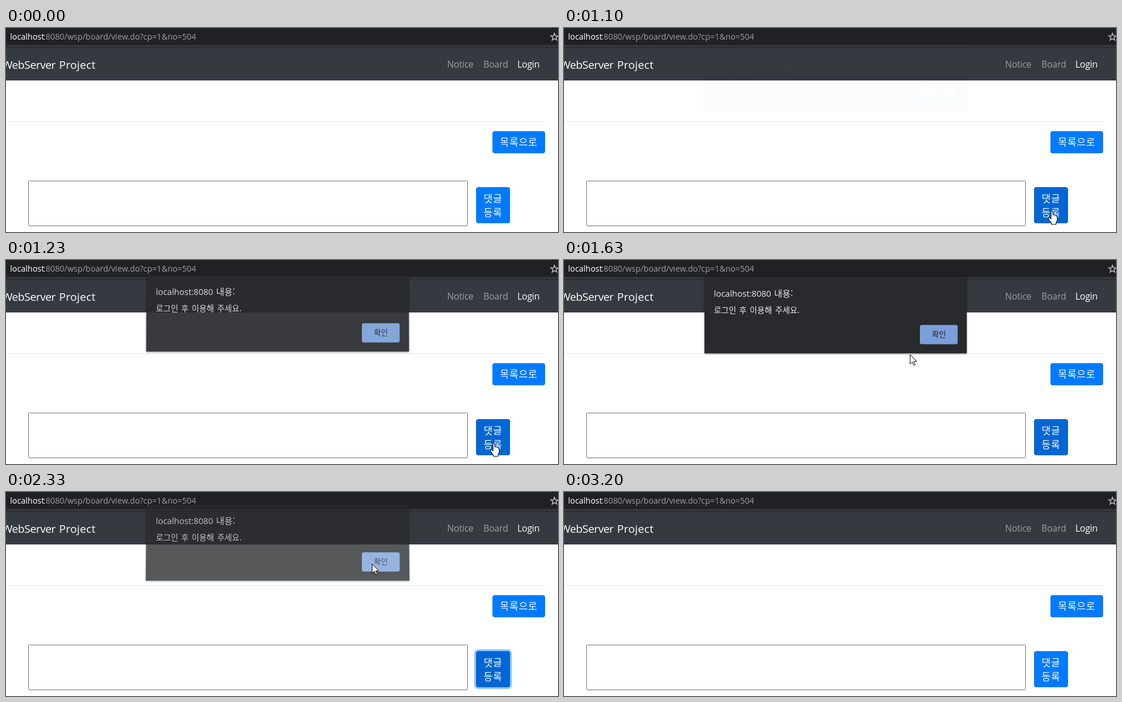
These frames come from a looping animation (943x350 px, 3.23 s). An HTML page:

```html
<!DOCTYPE html>
<html lang="ko">
<head>
<meta charset="utf-8">
<title>Login required</title>
<style>
  html, body { margin: 0; width: 100%; height: 100%; overflow: hidden; background: #fff; }
  svg { display: block; width: 943px; height: 350px; }
  text { font-family: "Open Sans", "Noto Sans CJK KR", "Noto Sans CJK", sans-serif; white-space: pre; }
  .url { font-size: 13.95px; fill: #9aa0a6; }
  .brand { font-size: 18.8px; fill: #fff; text-anchor: end; }
  .nav { font-size: 15.4px; letter-spacing: -.2px; fill: #9a9da0; }
  .ko { font-family: "Noto Sans CJK KR", "Noto Sans CJK", sans-serif; }
  .btn { font-size: 16.5px; letter-spacing: .8px; fill: #fff; }
  .lit { fill: #fff; }
  #dialog { fill: #e8eaed; }
  #panel { fill: #292a2d; filter: drop-shadow(0 1.5px 1.5px rgba(0, 0, 0, .55)); }
  #arrow, #hand { fill: #fff; stroke: #000; stroke-linejoin: round; }
</style>
</head>
<body>
<svg viewBox="0 0 943 350">
  <rect width="943" height="350" fill="#fff"/>
  <rect width="943" height="29" fill="#202124"/>
  <rect y="29" width="943" height="4" fill="#35363a"/>
  <rect y="33" width="943" height="1" fill="#222327"/>
  <rect y="34" width="943" height="56" fill="#343a40"/>
  <text class="url lit" x="7" y="20">localhost</text>
  <text class="url" x="64" y="20">:8080/wsp/board/view.do?cp=1&amp;no=504</text>
  <path id="star" fill="none" stroke="#b4b7bb" stroke-width="1.5"/>

  <text class="brand" x="84.5" y="69.5" letter-spacing="-.5">WebServer</text>
  <text class="brand" x="153" y="69.5" letter-spacing=".2">Project</text>
  <text class="nav" x="753.5" y="68">Notice</text>
  <text class="nav" x="815.5" y="68">Board</text>
  <text class="nav lit" x="873.5" y="68">Login</text>

  <rect y="160" width="921" height="1" fill="#e5e5e5"/>
  <rect x="831" y="177" width="90" height="38" rx="4" fill="#007bff"/>
  <text class="btn ko" x="844" y="202">목록으로</text>
  <rect x="38.5" y="262.5" width="750" height="77" rx="1" fill="#fff" stroke="#767676"/>

  <rect id="ring" fill="#93c7ff"/>
  <rect id="submit" x="803" y="273" width="58" height="62" rx="4"/>
  <text class="btn ko" x="816" y="298.5">댓글</text>
  <text class="btn ko" x="816" y="322.5">등록</text>

  <g id="dialog">
    <polygon id="panel"/>
    <text x="256" y="63" font-size="14.5">localhost:8080</text>
    <text class="ko" x="359" y="63" font-size="15.2">내용:</text>
    <text class="ko" x="256" y="91" font-size="13.8" word-spacing="1.4">로그인 후 이용해 주세요.</text>
    <rect x="608" y="111.5" width="64.5" height="33" rx="3" fill="#7b9fd9"/>
    <text class="ko" x="628.5" y="132" font-size="13" fill="#202124">확인</text>
  </g>

  <path id="arrow" d="M.5.5V16.5L4.2 13.1L6.8 19L9.2 18L6.7 12.2H11.8Z"/>
  <path id="hand" d="M-1.5 1.5Q0-.5 1.5 1.5V7.5Q3.5 6 4.4 8.2Q6.2 7.2 7 9.2Q9 8.6 9.2 11V16L7.2 20V23.5H-1V21L-5.8 14.5Q-6.6 12-4.2 12L-1.5 14.5Z"/>
</svg>
<script>
const LOOP = 3230;
const $ = id => document.getElementById(id);
const set = (id, attrs) => {
  for (const k in attrs) $(id).setAttribute(k, attrs[k]);
};
const ramp = (t, a, b) => Math.min(1, Math.max(0, (t - a) / (b - a)));
const smooth = p => p * p * (3 - 2 * p);
const mix = (a, b, p) => a + (b - a) * p;

// time, x, y of the pointer's hot spot
const track = [
  [530, 836, 345], [600, 833, 335], [830, 833, 335], [930, 833.5, 313.5],
  [1430, 833.5, 313.5], [1530, 722, 248], [1630, 591, 162], [1720, 571, 142],
  [1830, 602, 127], [1930, 625, 123], [2530, 625, 123]
];

function pointer(t) {
  const i = track.findIndex(k => t < k[0]);
  if (i < 1) return null;
  const [a, b] = [track[i - 1], track[i]];
  const p = ramp(t, a[0], b[0]);
  return [mix(a[1], b[1], p), mix(a[2], b[2], p)];
}

function drawPointer(t) {
  const pos = pointer(t);
  const kind = t >= 860 && t < 1440 ? "hand" : "arrow";
  for (const id of ["arrow", "hand"]) {
    const on = pos && id === kind;
    set(id, { visibility: on ? "visible" : "hidden" });
    if (on) set(id, { transform: `translate(${pos})` });
  }
}

function drawSubmit(t) {
  const reset = ramp(t, 3070, 3200);
  const hover = ramp(t, 860, 1010) * (1 - reset);
  set("submit", { fill: `rgb(0,${mix(123, 102, hover)},${mix(255, 212, hover)})` });

  // the focus ring stalls while the alert is open
  const focus = .15 * ramp(t, 1060, 1100) + .85 * ramp(t, 2230, 2330);
  const r = 3.2 * focus * (1 - reset);
  set("ring", {
    x: 803 - r, y: 273 - r, width: 58 + 2 * r, height: 62 + 2 * r,
    rx: 4 + r, opacity: Math.min(1, r / 2)
  });
}

function drawDialog(t) {
  const open = ramp(t, 1090, 1260);
  const shut = ramp(t, 2280, 2420);
  const lift = 18 * (1 - open) + 18 * shut ** .8;
  const flare = lift * .15;
  const alpha = smooth(open) * (1 - shut ** 1.5);
  set("panel", {
    points: `240,29.5 688,29.5 ${688 + flare},160 ${240 - flare},160`
  });
  set("dialog", { transform: `translate(0 ${-lift})`, opacity: alpha });
}

function draw(t) {
  drawSubmit(t);
  drawDialog(t);
  drawPointer(t);
}

const star = Array.from({ length: 10 }, (_, i) => {
  const a = i * Math.PI / 5, r = i % 2 ? 2.8 : 6.6;
  return [937 + r * Math.sin(a), 15.5 - r * Math.cos(a)];
});
set("star", { d: `M${star.join("L")}Z` });

const start = performance.now();
function tick() {
  draw((performance.now() - start) % LOOP);
  requestAnimationFrame(tick);
}
tick();
</script>
</body>
</html>
```
